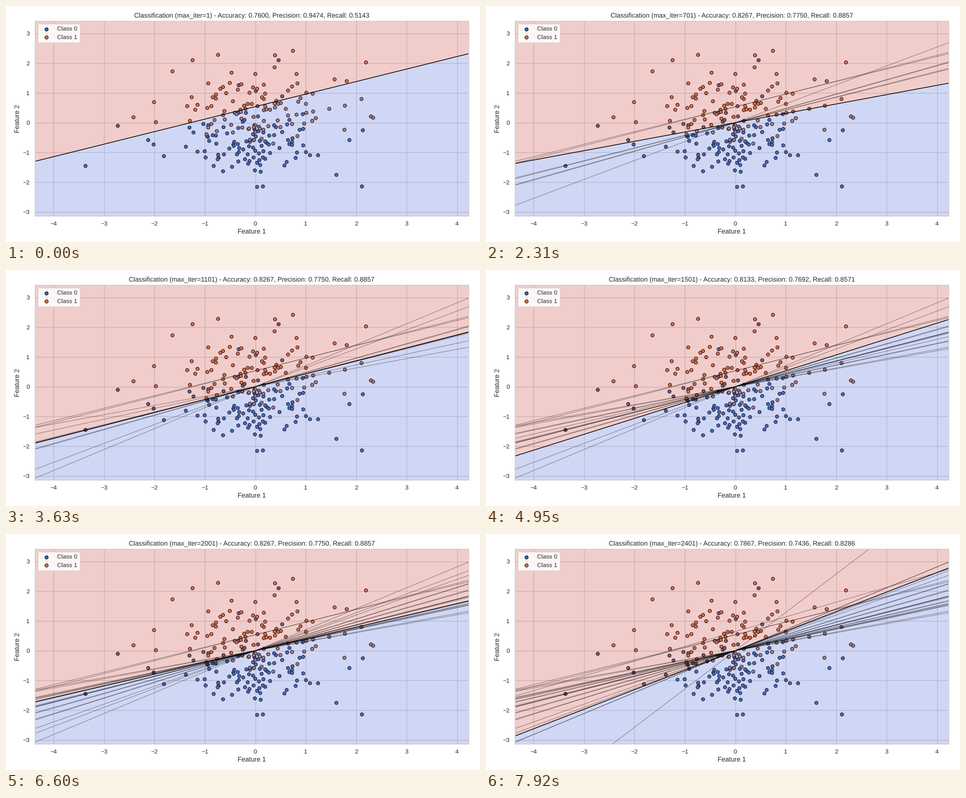
Animation of 1058 by 529 pixels, one loop 8250 ms. Source, as a matplotlib script:

```python
import numpy as np
import matplotlib.pyplot as plt
from matplotlib.animation import FuncAnimation

W, H = 1058, 529
XLIM, YLIM = np.array([-4.37, 4.227]), (-3.135, 3.42)
STEP_MS = 330
POS, NEG = 70, 80          # evaluation samples per class

plt.rcParams.update({
    "font.family": "Liberation Sans", "font.size": 12,
    "text.hinting": "none", "text.color": "0.15", "axes.labelcolor": "0.15",
    "xtick.color": "0.15", "ytick.color": "0.15",
    "xtick.labelsize": 11, "ytick.labelsize": 11,
    "axes.edgecolor": "0.8", "axes.linewidth": 1.25,
    "axes.titlesize": 12, "legend.fontsize": 11,
    "grid.color": "0.8", "grid.linewidth": 1.0,
})

# Fitted slope per step; boundaries cross the origin unless lifted.
slopes = [.421, .434, .483, .432, .425, .636, .477, .314, .432, .705, .365,
          .435, .302, .398, .360, .534, .599, .529, .371, .377, .394, 1.289,
          .496, .704, .657]
lifts = {0: .54, 1: .53, 22: .64}

# Far points of each class; the rest is a seeded normal cloud.
far0 = [(-3.37, -1.45), (-2.73, -.1), (-2.13, -.57), (-2.02, -.73),
        (-1.82, -1.11), (.46, 2.1), (-.33, 1.27), (0, 1.08), (.53, .89),
        (.03, -2.15), (.15, -2.13), (1.6, -1.74), (2.11, -2.13),
        (1.86, -.58), (2.13, -.25)]
far1 = [(-2.42, .19), (-2.01, .7), (-1.98, .03), (-1.65, 1.74), (-1.25, 2.1),
        (-.74, 2.29), (.39, 2.28), (.74, 2.42), (2.19, 2.04), (1.81, 1.4),
        (1.57, 1.47), (2.1, .8), (1.77, .58), (2.29, .22), (2.33, .17),
        (1.76, -.23)]


def cloud(far, mean, spread, total, rng):
    """Far points plus a normal cloud cut at two deviations."""
    pts = list(far)
    while len(pts) < total:
        z = rng.normal(size=2)
        p = np.add(mean, z * spread)
        gap = min(np.hypot(p[0] - x, p[1] - y) for x, y in pts)
        if np.hypot(*z) < 2 and gap > .05:
            pts.append(tuple(p))
    return np.array(pts)


def boundary(k):
    return slopes[k] * XLIM + lifts.get(k, 0)


def hits(k):
    """True and false positives; steep boundaries do worse."""
    if lifts.get(k):
        return 36, 2
    worse = int(np.clip(round(90 * (slopes[k] - .64)), 0, 11))
    return 62 - worse - 2 * (slopes[k] > .5), 18 + worse


def title(k):
    tp, fp = hits(k)
    acc = (tp + NEG - fp) / (POS + NEG)
    return (f"Classification (max_iter={100 * k + 1}) - Accuracy: {acc:.4f}, "
            f"Precision: {tp / (tp + fp):.4f}, Recall: {tp / POS:.4f}")


rng = np.random.default_rng(7)
groups = [
    (cloud(far0, (0, -.65), (.75, .65), 112, rng), "#4c72b0", "Class 0"),
    (cloud(far1, (0, .6), (.75, .68), 110, rng), "#dd8452", "Class 1"),
]

fig = plt.figure(figsize=(12, 6), dpi=W / 12, facecolor="white")
ax = fig.add_axes([64.5 / W, 1 - 470.5 / H, 968 / W, 437 / H])
ax.set_axisbelow(True)
ax.grid(True)
ax.tick_params(length=6, width=0, pad=3.5)
ax.set(xlabel="Feature 1", ylabel="Feature 2",
       xticks=range(-4, 5), yticks=range(-3, 4))
head = ax.set_title("", pad=6)

for pts, color, name in groups:
    ax.scatter(*pts.T, s=36, c=color, edgecolors="black", linewidths=1,
               label=name, zorder=1)


def region(color):
    return ax.fill([0, 1, 1, 0], [0, 0, 1, 1], color=color, alpha=.25,
                   lw=0, antialiased=False, zorder=1.2)[0]


lower = region((.28, .38, .83))
upper = region((.78, .22, .20))
lines = [ax.plot(XLIM, boundary(k), color="black", zorder=1.5)[0]
         for k in range(len(slopes))]
ax.set(xlim=XLIM, ylim=YLIM)
ax.legend(loc="upper left", framealpha=.88, edgecolor="0.8",
          scatterpoints=1).set_zorder(5)


def draw(k):
    left, right = boundary(k)
    for patch, edge in ((lower, -9), (upper, 9)):
        patch.set_xy([(XLIM[0], left), (XLIM[1], right),
                      (XLIM[1], edge), (XLIM[0], edge)])
    for i, line in enumerate(lines):
        line.set_visible(i <= k)
        line.set_alpha(1 if i == k else .45)
        line.set_linewidth(1.3 if i == k else .85)
    head.set_text(title(k))
    return [lower, upper, head, *lines]


anim = FuncAnimation(fig, draw, frames=len(slopes), init_func=lambda: draw(0),
                     interval=STEP_MS, repeat=True, repeat_delay=0, blit=False)
plt.show()
```
